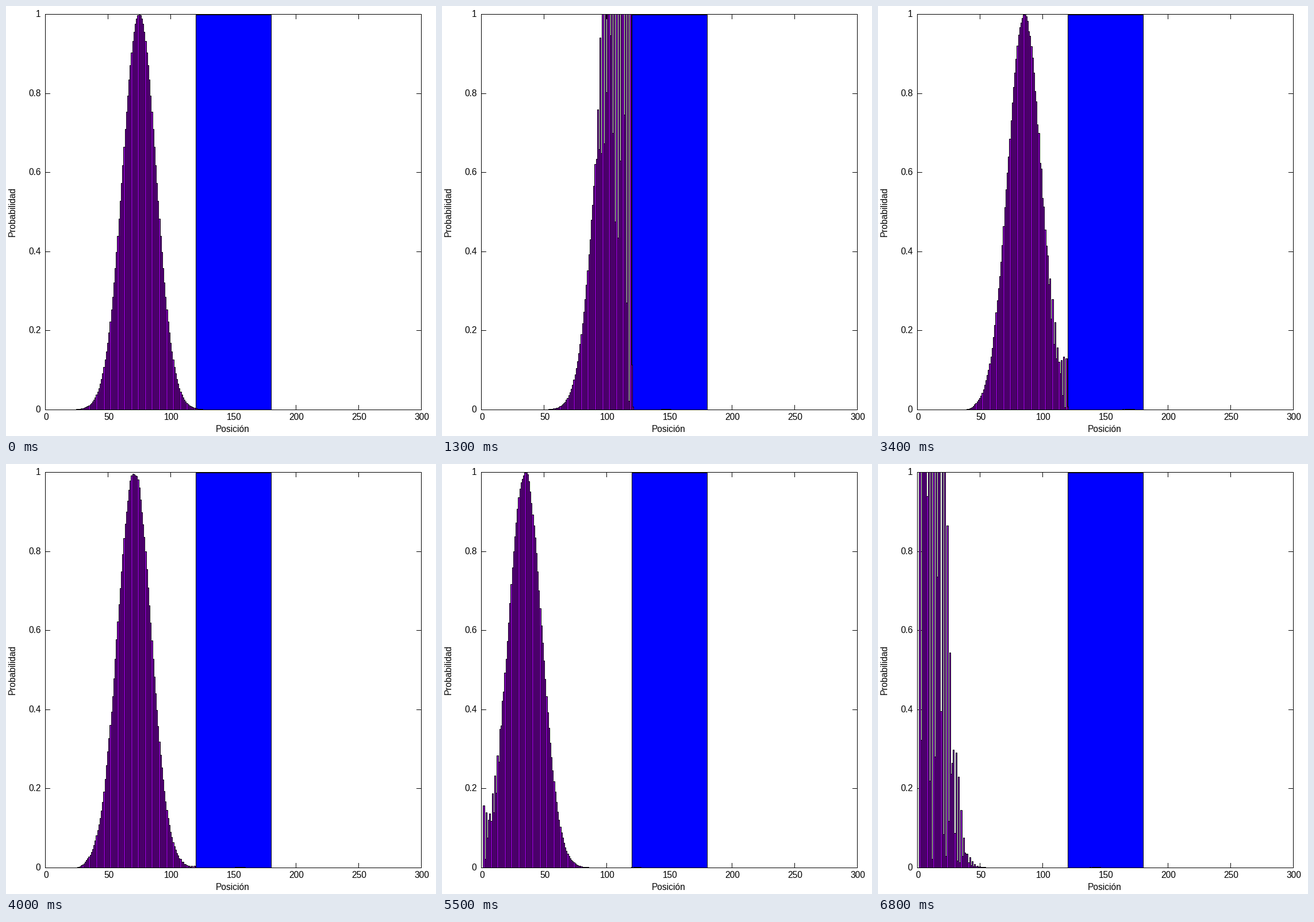
These frames come from a looping animation (748x748 px, 6.9 s). A matplotlib script:

```python
import numpy as np
import matplotlib.pyplot as plt
from matplotlib.animation import FuncAnimation
from matplotlib.collections import PolyCollection
from matplotlib.patches import Rectangle

SIZE, DPI = 748, 64
PX = 72 / DPI                      # one pixel in points
FRAMES, INTERVAL = 69, 100
X0, XS = 68.62, 2.18               # plot-to-pixel mapping
Y0, YS = 702.45, 688
TICK = 8
PURPLE = "#9400d3"

# Wave packet hitting a square barrier, Crank-Nicolson scheme
N, CYCLES, HEIGHT = 300, 68, 2.0
STEPS = 10
k0 = 2 * np.pi * CYCLES / N
s = 1 / (4 * k0 ** 2)
pos = np.arange(2, N)


def propagator():
    wall = (pos >= 2 * N // 5) & (pos <= 3 * N // 5)
    v = HEIGHT * k0 ** 2 * wall
    side = np.ones(len(pos) - 1)
    a = np.diag(-2 + 2j / s - v) + np.diag(side, 1) + np.diag(side, -1)
    return 4j / s * np.linalg.inv(a) - np.eye(len(pos))


def evolve():
    one = propagator()
    many = np.linalg.matrix_power(one, STEPS)
    psi = np.exp(1j * k0 * pos - 8 * (4 * pos - N) ** 2 / N ** 2)
    probs = [np.abs(psi) ** 2]
    psi = one @ psi
    for _ in range(FRAMES - 1):
        probs.append(np.abs(psi) ** 2)
        psi = many @ psi
    return probs


def px(x):
    return np.floor(X0 + XS * np.asarray(x)) + 0.5


def py(y):
    return np.floor(Y0 - YS * np.asarray(y)) + 0.5


probs = evolve()
left, right = px(pos - 0.5), px(pos + 0.5)
base = np.full(len(pos), float(py(0)))


def boxes(p):
    top = py(np.minimum(p, 1))
    return np.stack([np.column_stack(c) for c in
                     ((left, base), (left, top), (right, top), (right, base))], axis=1)


fig = plt.figure(figsize=(SIZE / DPI, SIZE / DPI), dpi=DPI, facecolor="white")
ax = fig.add_axes([0, 0, 1, 1])
ax.set_xlim(0, SIZE)
ax.set_ylim(SIZE, 0)
ax.axis("off")


def rect(x1, y1, x2, y2, fill, z):
    ax.add_patch(Rectangle((x1, y1), x2 - x1, y2 - y1, fc=fill, ec="black",
                           lw=PX, joinstyle="miter", snap=False, zorder=z))


def line(xs, ys):
    ax.plot(xs, ys, color="black", lw=PX, solid_capstyle="projecting",
            snap=False, zorder=0.5)


def label(x, y, text, ha="center", rot=0):
    ax.text(x, y, text, family="Liberation Sans", size=15.5 * PX, ha=ha,
            va="baseline", rotation=rot, rotation_mode="anchor")


# Ticks lie under the barrier and the bars, the frame on top
x1, x2, y1, y2 = px(0), px(N), py(1), py(0)
rect(px(120), y1 + 1, px(180), y2, "#0000ff", 1)
bars = PolyCollection(boxes(probs[0]), facecolors=PURPLE, edgecolors="black",
                      linewidths=PX, joinstyle="miter", snap=False, zorder=2)
ax.add_collection(bars, autolim=False)
rect(x1, y1, x2, y2, "none", 4)

for t in range(0, N + 1, 50):
    x = px(t)
    line([x, x], [y1, y1 + TICK])
    line([x, x], [y2, y2 - TICK])
    label(x + 1, 720.5, str(t))
for t in np.arange(6) / 5:
    y = py(t)
    line([x1, x1 + TICK], [y, y])
    line([x2, x2 - TICK], [y, y])
    label(60.5, y + 4.5, f"{t:g}", ha="right")
label(394.5, 741, "Posición")
label(16, 358, "Probabilidad", rot=90)


def draw(i):
    bars.set_verts(boxes(probs[i]))
    return [bars]


anim = FuncAnimation(fig, draw, frames=FRAMES, interval=INTERVAL,
                     init_func=lambda: draw(0), repeat=True, repeat_delay=0, blit=False)
plt.show()
```
